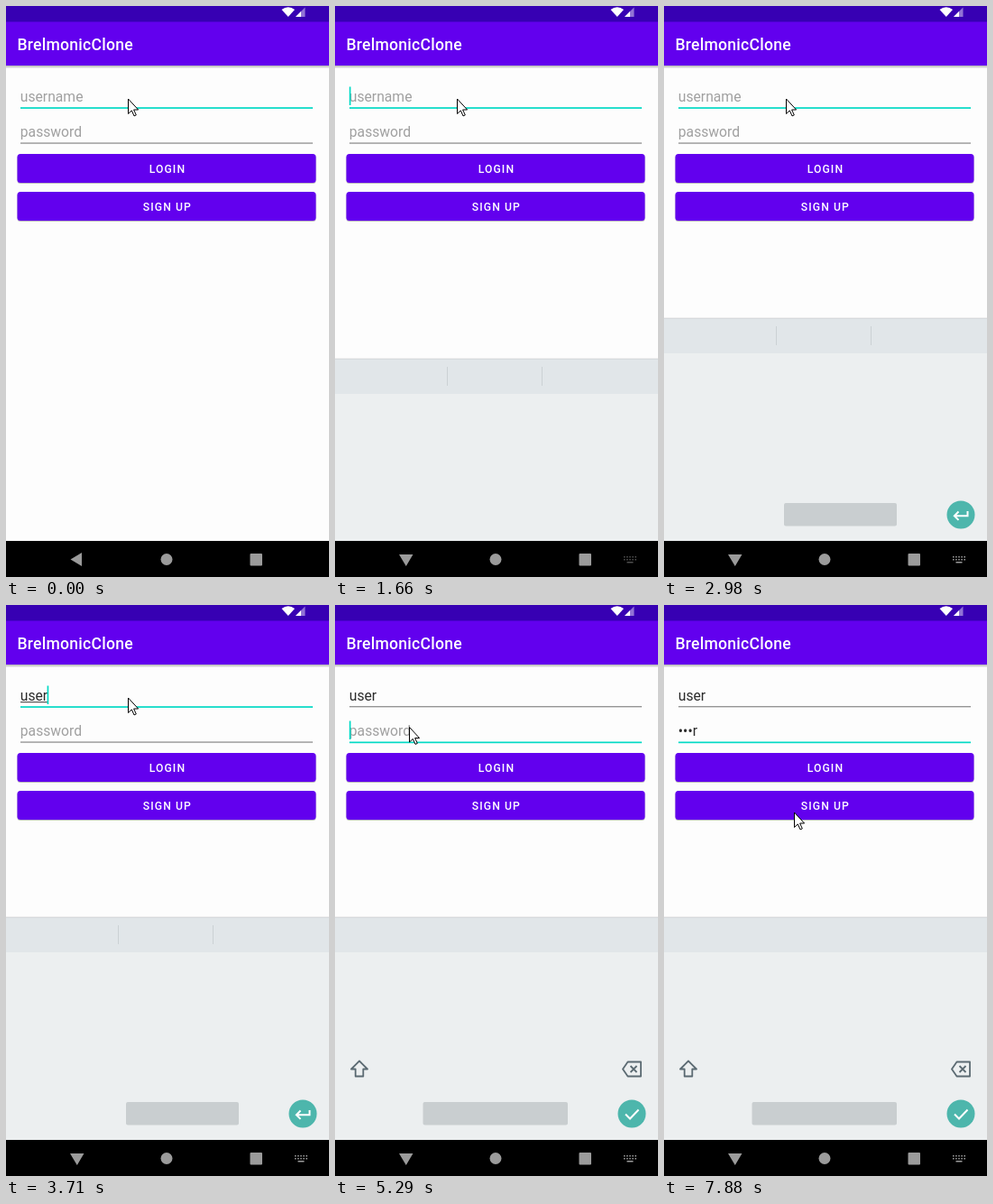
An HTML page that plays this animation: 358 px wide and 633 px high, repeating every 8000 ms.

```html
<!DOCTYPE html>
<html lang="en">
<head>
<meta charset="utf-8">
<title>Login form</title>
<style>
  html, body { margin: 0; width: 100%; height: 100%; overflow: hidden; background: #fdfdfd; }
  svg { display: block; width: 358px; height: 633px; font-family: Roboto, sans-serif; }
  text { white-space: pre; }
  .title { font-size: 17.6px; font-weight: 500; letter-spacing: .25px; }
  .field { font-size: 15.7px; }
  .button { font-size: 12.2px; font-weight: 500; letter-spacing: 1.09px; text-anchor: middle; }
  .icon { fill: none; stroke: #5b6a72; stroke-width: 1.8; stroke-linejoin: round; }
  .mark { fill: none; stroke: #fff; stroke-width: 2; }
</style>
</head>
<body>
<svg viewBox="0 0 358 633">
  <defs>
    <linearGradient id="shade" x2="0" y2="1">
      <stop stop-color="#000" stop-opacity=".3"/>
      <stop offset="1" stop-color="#000" stop-opacity="0"/>
    </linearGradient>
    <clipPath id="aboveNav"><path d="M0 0h358v593H0z"/></clipPath>
  </defs>

  <path fill="#fdfdfd" d="M0 0h358v633H0z"/>
  <path fill="url(#shade)" d="M0 66h358v3.5H0z"/>
  <path fill="#6200ee" d="M0 17h358v49H0z"/>
  <path fill="#3700b3" d="M0 0h358v17.500H0z"/>
  <path fill="#fff" d="M305.500 4Q312.800-1.500 320 4l-7.200 8z"/>
  <path fill="#fff" opacity=".45" d="M321 12h10.500V1.500z"/>
  <path fill="#fff" d="M321 12h6V6z"/>
  <text class="title" x="12.400" y="49" fill="#fff">BrelmonicClone</text>

  <g id="fields"></g>
  <rect id="caret" y="89.500" width="1.700" height="20.500" fill="#03dac5"/>
  <g id="buttons"></g>

  <g clip-path="url(#aboveNav)">
    <g id="keyboard">
      <path fill="#eceff0" d="M0 346h358v247H0z"/>
      <path fill="#e1e6e9" d="M0 346h358v39H0z"/>
      <path fill="#000" opacity=".05" d="M0 345h358v2H0z"/>
      <rect id="space" y="551" height="25.500" rx="2" fill="#c9ced0"/>
      <circle cx="329" cy="564" r="15.500" fill="#4db6ac"/>
      <g id="textKeys">
        <path stroke="#cbd1d4" d="M124.500 355v21M229.500 355v21"/>
        <path class="mark" d="M336.500 560v5.200h-14M326.500 560.500l-4.700 4.700 4.700 4.700"/>
      </g>
      <g id="passwordKeys">
        <path class="icon" d="M27 505.500l-9 9h4.700v8h8.600v-8h4.700z"/>
        <path class="icon" d="M324.500 506.500h14.500v16h-14.500l-5.500-8zM327.500 511l7 7m0-7l-7 7"/>
        <path class="mark" d="M322 564.500l5 5 9.500-10"/>
      </g>
    </g>
  </g>

  <path d="M0 593h358v40H0z"/>
  <g fill="#9b9b9b">
    <path id="back"/>
    <circle cx="178" cy="613.500" r="6.500"/>
    <rect x="270.500" y="607" width="13.500" height="13.500" rx="1"/>
    <g id="imeIcon">
      <path fill="none" stroke="#9b9b9b" stroke-width="1.600" stroke-dasharray="1.600 1.500"
        d="M320 610.800h14.500M320 613.700h14.500"/>
      <path d="M323.500 616h7v1.500h-7z"/>
    </g>
  </g>
  <path id="pointer" fill="#fff" stroke="#000" stroke-linejoin="round"
    d="M.5.500v16.500l3.800-3.600 2.700 6 2.300-1-2.700-5.900h5z"/>
</svg>
<script>
const LOOP = 8000, FOCUS_PASSWORD = 5290;
const $ = id => document.getElementById(id);

// Each list holds [start time, value] pairs.
const username = [[0, ''], [3410, 'u'], [3560, 'use'], [3710, 'user']];
const password = [[0, ''], [6220, 'u'], [6470, '•s'], [6910, '••e'], [7060, '•••r']];
const pointer = [
  [0, [135, 102.5]], [4630, [121, 111]], [4770, [106, 121]], [4900, [93, 129]],
  [5040, [82, 134]], [5160, [82, 135]], [7510, [94, 157]], [7630, [116, 190]],
  [7760, [136, 218]], [7880, [144, 229.5]]
];
const caretToggles = [430, 990, 1420, 1960, 2410, 2980, 3410, 4230, 4630, 5830, 6220, 7510];
const at = (steps, t) => steps.filter(([start]) => start <= t).pop()[1];

function add(parent, tag, attributes, text = '') {
  const node = document.createElementNS('http://www.w3.org/2000/svg', tag);
  set(node, attributes);
  node.textContent = text;
  return parent.appendChild(node);
}

function set(node, attributes) {
  for (const name in attributes) node.setAttribute(name, attributes[name]);
}

const show = (node, visible) => set(node, { opacity: +visible });

function makeField(hint, baseline) {
  return {
    hint,
    rule: add($('fields'), 'rect', { x: 16, y: baseline + 6.5, width: 324 }),
    text: add($('fields'), 'text', { class: 'field', x: 15.8, y: baseline }),
    composing: add($('fields'), 'rect', { x: 16, y: baseline + 1.5, height: 1, fill: '#333' })
  };
}

function makeButton(label, y) {
  const box = { x: 12.5, width: 331, height: 32, rx: 3.5 };
  add($('buttons'), 'rect', { ...box, y: y + 1, opacity: .25 });
  add($('buttons'), 'rect', { ...box, y, fill: '#6200ee' });
  add($('buttons'), 'text', { class: 'button', x: 178.9, y: y + 20.8, fill: '#fff' }, label);
}

const fields = [makeField('username', 105.7), makeField('password', 145)];
makeButton('LOGIN', 164);
makeButton('SIGN UP', 206);

function drawField(field, value, focused, composing) {
  field.text.textContent = value || field.hint;
  set(field.text, { fill: value ? '#2b2b2b' : '#a0a0a0' });
  set(field.rule, { height: focused ? 1.7 : 1.1, fill: focused ? '#03dac5' : '#7c7c7c' });
  const width = value ? field.text.getComputedTextLength() : 0;
  set(field.composing, { width: composing ? width : 0 });
  return width;
}

function draw(t) {
  const onPassword = t >= FOCUS_PASSWORD;
  const widths = [
    drawField(fields[0], at(username, t), !onPassword, !onPassword),
    drawField(fields[1], at(password, t), onPassword, false)
  ];
  set($('caret'), {
    x: 15.8 + widths[+onPassword] - (widths[+onPassword] ? .6 : 0),
    y: onPassword ? 128.5 : 89.5
  });
  show($('caret'), caretToggles.filter(start => start <= t).length % 2);

  const open = t >= 1660, settled = t >= 1810;
  show($('keyboard'), open);
  set($('keyboard'), { transform: `translate(0 ${settled ? 0 : 45})` });
  show($('textKeys'), !onPassword);
  show($('passwordKeys'), onPassword);
  set($('space'), onPassword ? { x: 97.5, width: 160.5 } : { x: 133, width: 125 });
  set($('back'), { d: open ? 'M71 608h15.500l-7.750 13z' : 'M71.500 613.500l12.500-7.500v15z' });
  set($('imeIcon'), { opacity: settled ? 1 : open ? .5 : 0 });

  set($('pointer'), { transform: `translate(${at(pointer, t)})` });
}

function tick() {
  draw(performance.now() % LOOP);
  requestAnimationFrame(tick);
}
tick();
</script>
</body>
</html>
```
